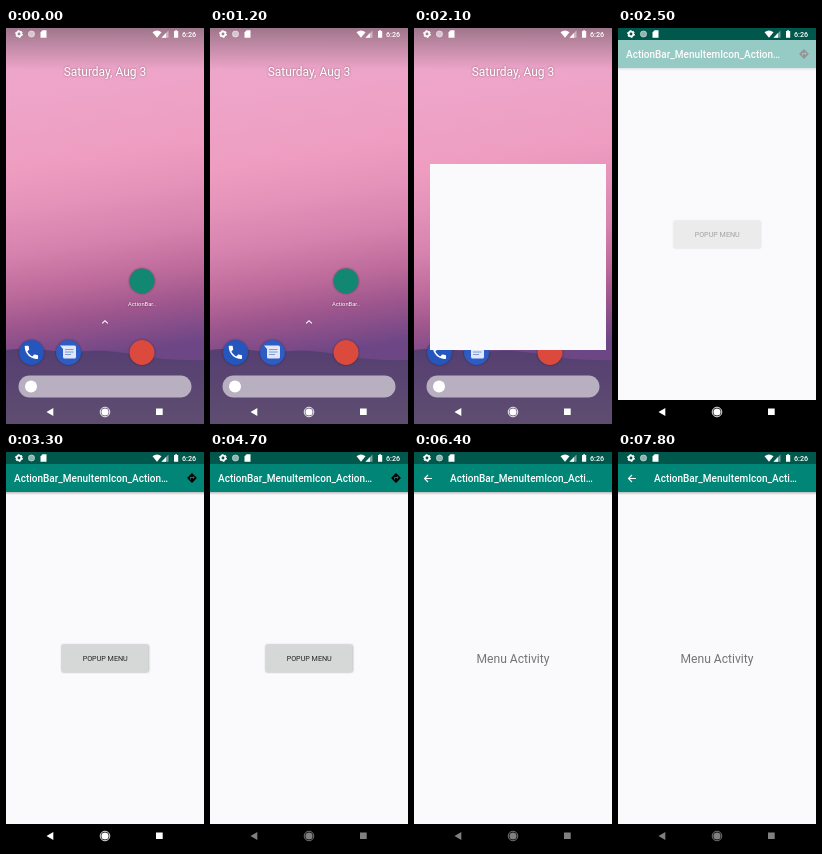
Write an HTML page that moves like this. It is 198x396 px and loops after 8000 ms.

```html
<!DOCTYPE html>
<html lang="en">
<head>
<meta charset="utf-8">
<title>Opening an app and its menu screen</title>
<style>
  html, body { margin: 0; width: 100%; height: 100%; overflow: hidden; background: #000; }
  svg { display: block; width: 100vw; height: 100vh; }
  text { font-family: Roboto, "Open Sans", sans-serif; }
  .mid { text-anchor: middle; }
  .title { font-size: 10px; font-weight: 500; fill: #fff; }
  .soft { filter: drop-shadow(0 .5px 1px rgba(0, 0, 0, .4)); }
</style>
</head>
<body>
<svg viewBox="0 0 198 396">
  <defs>
    <linearGradient id="sky" gradientUnits="userSpaceOnUse" x1="72" y1="0" x2="122" y2="325">
      <stop offset="0" stop-color="#eda6cb"/>
      <stop offset=".2" stop-color="#eda4c8"/>
      <stop offset=".4" stop-color="#ee9dc0"/>
      <stop offset=".52" stop-color="#e492b9"/>
      <stop offset=".65" stop-color="#d682ae"/>
      <stop offset=".77" stop-color="#bd6b9b"/>
      <stop offset=".87" stop-color="#9e568d"/>
      <stop offset="1" stop-color="#6d4686"/>
    </linearGradient>
    <linearGradient id="hill" x1="0" y1="0" x2="0" y2="1">
      <stop offset="0" stop-color="#553f72"/>
      <stop offset="1" stop-color="#5f4d70"/>
    </linearGradient>
    <linearGradient id="scrim" x1="0" y1="0" x2="0" y2="1">
      <stop offset="0" stop-color="#333" stop-opacity=".42"/>
      <stop offset="1" stop-color="#333" stop-opacity="0"/>
    </linearGradient>
    <linearGradient id="drop" x1="0" y1="0" x2="0" y2="1">
      <stop offset="0" stop-opacity=".25"/>
      <stop offset="1" stop-opacity="0"/>
    </linearGradient>
    <g id="bar">
      <rect y="40" width="198" height="3" fill="url(#drop)"/>
      <rect y="12" width="198" height="28" fill="#008577"/>
    </g>
  </defs>

  <g id="home">
    <rect width="198" height="396" fill="url(#sky)"/>
    <path d="M0 322Q20 319 40 322T80 323T130 327T198 332V396H0Z" fill="url(#hill)"/>
    <rect width="198" height="42" fill="url(#scrim)"/>
    <text class="mid soft" x="99" y="48" font-size="12" fill="#fff">Saturday, Aug 3</text>
    <g class="soft">
      <circle cx="136" cy="253" r="12.5" fill="#128872"/>
      <circle cx="25.5" cy="324.5" r="12.5" fill="#2456bd"/>
      <circle cx="62.5" cy="324.5" r="12.5" fill="#2c5cc4"/>
      <circle cx="136" cy="324.5" r="12.5" fill="#db4a3c"/>
    </g>
    <path transform="translate(16.500 315.500) scale(.74)" fill="#fff" d="M6.6 10.8c1.4 2.8 3.8 5.1 6.6 6.6l2.2-2.2c.3-.3.7-.4 1-.2 1.1.4 2.3.5 3.6.5.6 0 1 .5 1 1V20c0 .6-.4 1-1 1C10.600 21 3 13.400 3 4c0-.5.5-1 1-1h3.500c.6 0 1 .5 1 1 0 1.300.2 2.500.6 3.600.1.300 0 .7-.3 1z"/>
    <path d="M54 317.500H68.500q1.500 0 1.500 1.500v10q0 1.500-1.500 1.500h-10q-1.500 0-1.500-1.500V321Z" fill="#dfe7f8"/>
    <path d="M59 321.500h8.500M59 324h8.500M59 326.500h6" stroke="#7f9bd4"/>
    <text class="mid soft" x="136" y="278" font-size="5.8" fill="#fff">ActionBar..</text>
    <path d="M96.200 295.300L99 292.700L101.800 295.300" fill="none" stroke="#fff" stroke-width="1.100"/>
    <rect x="12.500" y="347.500" width="173" height="22" rx="11" fill="#b8afc1"/>
    <circle cx="25" cy="358.500" r="6" fill="#fff"/>
  </g>

  <rect id="reveal" fill="#faf9fb"/>

  <g id="app">
    <rect width="198" height="396" fill="#faf9fb"/>
    <g id="content">
      <use href="#bar"/>
      <text class="title" x="8" y="30.300">ActionBar_MenuItemIcon_Action…</text>
      <path transform="translate(180.200 20.200) scale(.482)" d="M21.700 11.300l-9-9c-.4-.4-1-.4-1.400 0l-9 9c-.4.4-.4 1 0 1.400l9 9c.4.4 1 .4 1.400 0l9-9c.4-.4.4-1 0-1.400zM14 14.500V12h-4v3H8v-4c0-.6.4-1 1-1h5V7.500l3.500 3.500z"/>
      <rect class="soft" x="56" y="193" width="86.500" height="27" rx="1" fill="#d6d7d7"/>
      <text class="mid" x="99.200" y="209.200" font-size="7.200" fill="#222">POPUP MENU</text>
    </g>
    <rect width="198" height="12" fill="#00574b"/>
    <rect y="372" width="198" height="24"/>
  </g>

  <g id="menu">
    <rect width="198" height="396" fill="#faf9fb"/>
    <use href="#bar"/>
    <path d="M18 26.500H10.500M14 23L10.500 26.500L14 30" fill="none" stroke="#fff" stroke-width="1.100"/>
    <text class="title" x="36" y="30.300">ActionBar_MenuItemIcon_Acti…</text>
    <text class="mid" x="99" y="211" font-size="12.100" fill="#757575">Menu Activity</text>
    <rect width="198" height="12" fill="#00574b"/>
    <rect y="372" width="198" height="24"/>
  </g>

  <g fill="#fff">
    <circle cx="13" cy="6" r="2.300" fill="none" stroke="#fff" stroke-width="1.700"/>
    <circle cx="13" cy="6" r="3.500" fill="none" stroke="#fff" stroke-width="1" stroke-dasharray="1.830"/>
    <circle cx="25.500" cy="6" r="3.300" opacity=".55"/>
    <circle cx="25.500" cy="6" r="3" fill="none" stroke="#fff" stroke-width=".7" opacity=".5"/>
    <path d="M34.500 4.500L36.500 2.300H40.500V9.700H34.500Z"/>
    <path d="M146.500 4.200Q151 .700 155.500 4.200L151 9.800Z"/>
    <path d="M162.500 2.500V9.700H155.500Z" opacity=".45"/>
    <path d="M160 5.100V9.700H155.500Z"/>
    <path d="M168 3H169.200V2.200H171V3H172.200V9.800H168Z"/>
    <text x="176" y="8.700" font-size="7.200" font-weight="500">6:26</text>
  </g>

  <g id="nav" fill="#fff">
    <path d="M40.500 384L47.300 380V388Z"/>
    <circle cx="99" cy="384" r="3.600"/>
    <circle cx="99" cy="384" r="4.800" fill="none" stroke="#fff" stroke-width=".9"/>
    <rect x="150" y="380.500" width="6.700" height="6.500"/>
  </g>
</svg>
<script>
const LOOP = 8000, STEP = 100;
const el = id => document.getElementById(id);
const [reveal, app, content, menu, nav] = ["reveal", "app", "content", "menu", "nav"].map(el);

const part = (t, start, length) => Math.min(1, Math.max(0, (t - start) / length));
const mix = (a, b, p) => a + (b - a) * p;
const easeOut = (p, power) => 1 - (1 - p) ** power;
const smooth = p => p * p * (3 - 2 * p);
const show = (node, on) => node.setAttribute("visibility", on ? "visible" : "hidden");

// The window grows out of the launcher icon, faster sideways than up and down.
function growWindow(t) {
  const p = part(t, 1950, 330);
  const px = easeOut(p, 3.37), py = smooth(p);
  const left = mix(123, 0, px), right = mix(149, 198, px);
  const top = mix(240, 0, py), bottom = mix(267, 396, py);
  const box = { x: left, y: top, width: right - left, height: bottom - top };
  for (const key in box) reveal.setAttribute(key, Math.round(box[key]));
  show(reveal, p > 0 && p < 1);
  show(app, p === 1);
}

function draw(now) {
  const t = Math.floor(now % LOOP / STEP) * STEP;
  growWindow(t);
  content.setAttribute("opacity", part(t, 2400, 250));
  nav.setAttribute("opacity", mix(1, .5, part(t, 3700, 400)));

  const rise = mix(31.7, 0, easeOut(part(t, 5851, 350), 5));
  menu.setAttribute("transform", `translate(0 ${rise.toFixed(2)})`);
  menu.setAttribute("opacity", easeOut(part(t, 5851, 200), 4));
}

const start = performance.now();
function tick() {
  draw(performance.now() - start);
  requestAnimationFrame(tick);
}
tick();
</script>
</body>
</html>
```
